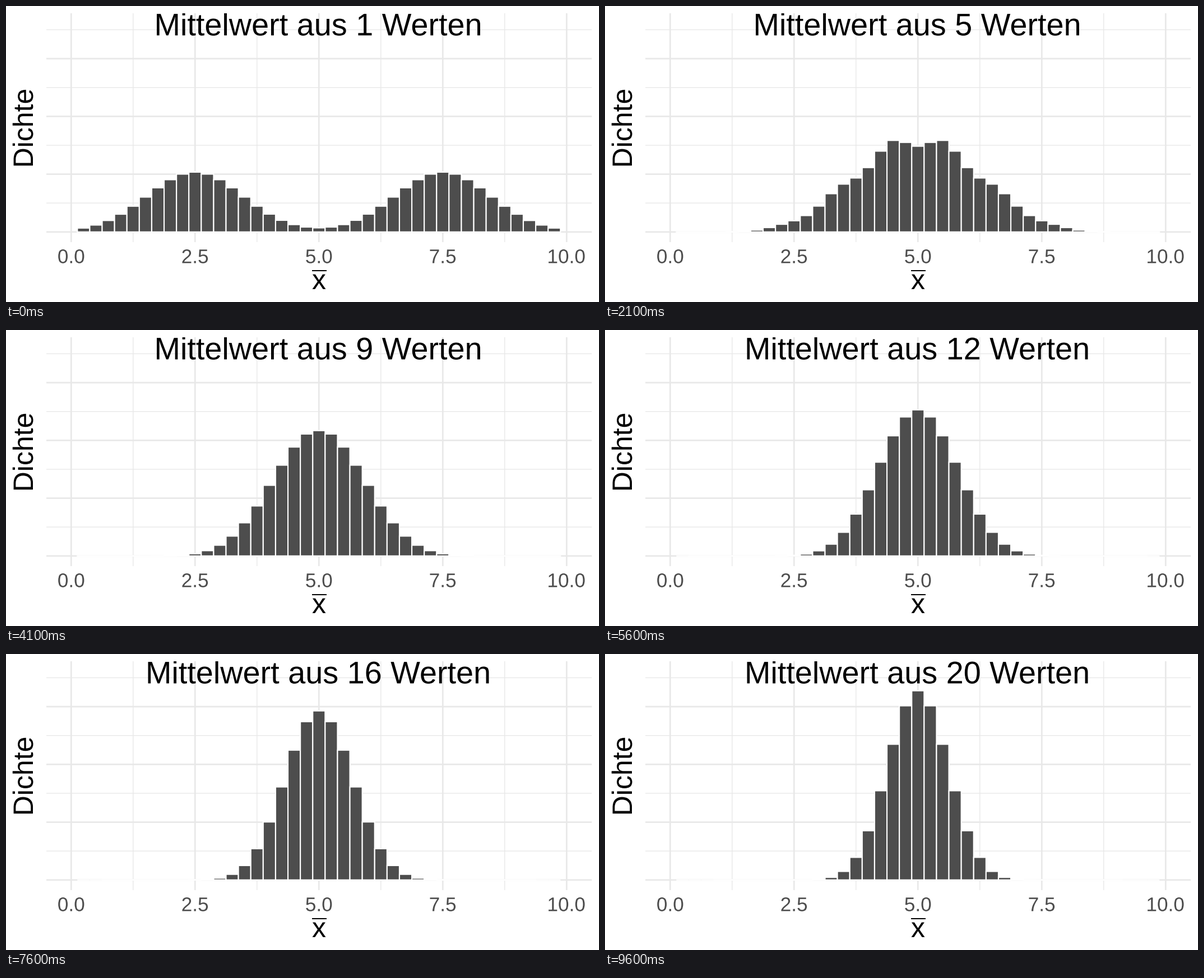
A matplotlib script for the animation above (10 s loop, 1058 px wide and 529 px high).

```python
from math import comb, erf, sqrt

import matplotlib.pyplot as plt
from matplotlib.animation import FuncAnimation
from matplotlib.patches import PathPatch, Rectangle
from matplotlib.textpath import TextPath
from matplotlib.transforms import Affine2D

W, H, DPI = 1058, 529, 64
PT = 72 / DPI  # points per pixel
LEFT, RIGHT, TOP, BOTTOM = 72, 1045, 13, 422
X0, UNIT = 116.3, 88.4  # pixel of x = 0 and pixels per unit of x
BASE, STEP = 403.8, 103.25  # zero line and spacing of the major rows
DENSITY = 516  # pixels per unit of density
BIN, BINS = 0.25, range(1, 40)
MEANS, SD = (2.5, 7.5), 0.96  # the two equally likely normals
GRID, GREY = "#E8E8E8", "#4D4D4D"

plt.rcParams["font.family"] = "Liberation Sans"


def px(x):
    return X0 + UNIT * x


def cdf(x, n):
    """Distribution of the mean of n draws from the two-normal mixture."""
    low, high = MEANS
    scale = SD * sqrt(2 / n)
    total = 0
    for k in range(n + 1):
        centre = low + (high - low) * k / n
        total += comb(n, k) * (1 + erf((x - centre) / scale)) / 2
    return total / 2**n


def bar_height(i, n):
    mass = cdf((i + 0.5) * BIN, n) - cdf((i - 0.5) * BIN, n)
    return DENSITY * mass / BIN


def text_path(x, y, s, size, angle=0):
    """Outline of s, its ink centred on the anchor along the baseline."""
    path = TextPath((0, 0), s, size=size)
    box = path.get_extents()
    place = Affine2D().translate(-(box.x0 + box.x1) / 2, 0).scale(1, -1)
    return path.transformed(place.rotate_deg(-angle).translate(x, y))


fig = plt.figure(figsize=(W / DPI, H / DPI), dpi=DPI, facecolor="white")
# Panel axes measured in stage pixels
ax = fig.add_axes([LEFT / W, 1 - BOTTOM / H, (RIGHT - LEFT) / W,
                   (BOTTOM - TOP) / H])
ax.set_xlim(LEFT, RIGHT)
ax.set_ylim(BOTTOM, TOP)
ax.axis("off")


def write(x, y, s, size, color="black", angle=0, clip=False):
    return ax.add_patch(PathPatch(text_path(x, y, s, size, angle), lw=0,
                                  facecolor=color, clip_on=clip, zorder=3))


def grid(xs, ys, width):
    style = dict(color=GRID, lw=width * PT, zorder=1, snap=False)
    for x in xs:
        ax.plot([x, x], [TOP, BOTTOM], **style)
    for y in ys:
        ax.plot([LEFT, RIGHT], [y, y], **style)


grid([px(1.25 + 2.5 * i) for i in range(4)],
     [BASE - STEP * (i + 0.5) for i in range(4)], 1.35)
grid([px(2.5 * i) for i in range(5)],
     [BASE - STEP * i for i in range(4)], 2.7)

bars = [ax.add_patch(Rectangle((px((i - 0.5) * BIN), BASE), UNIT * BIN, 0,
                               facecolor=GREY, edgecolor="white",
                               lw=2.13 * PT, joinstyle="miter", snap=False,
                               zorder=2))
        for i in BINS]

for i in range(5):
    write(px(2.5 * i), 459.5, f"{2.5 * i:.1f}", 35.2, GREY)
write(48, 217.5, "Dichte", 50, angle=90)
write(558.5, 506, "x", 50)
ax.plot([546, 571.5], [473, 473], color="black", lw=2 * PT, clip_on=False,
        solid_capstyle="butt")
title = write(557.5, 52.5, "", 55.8, clip=True) if False else ax.add_patch(
    PathPatch(text_path(557.5, 52.5, "Mittelwert", 55.8), lw=0,
              facecolor="black", zorder=3))


def update(frame):
    n = max(1, (frame - 1) // 5 + 1)
    title.set_path(text_path(557.5, 52.5, f"Mittelwert aus {n} Werten", 55.8))
    for i, bar in zip(BINS, bars):
        h = bar_height(i, n)
        bar.set_y(BASE - h)
        bar.set_height(h)
    return [title, *bars]


anim = FuncAnimation(fig, update, frames=100, interval=100, repeat=True,
                     repeat_delay=0, blit=False)
plt.show()
```
